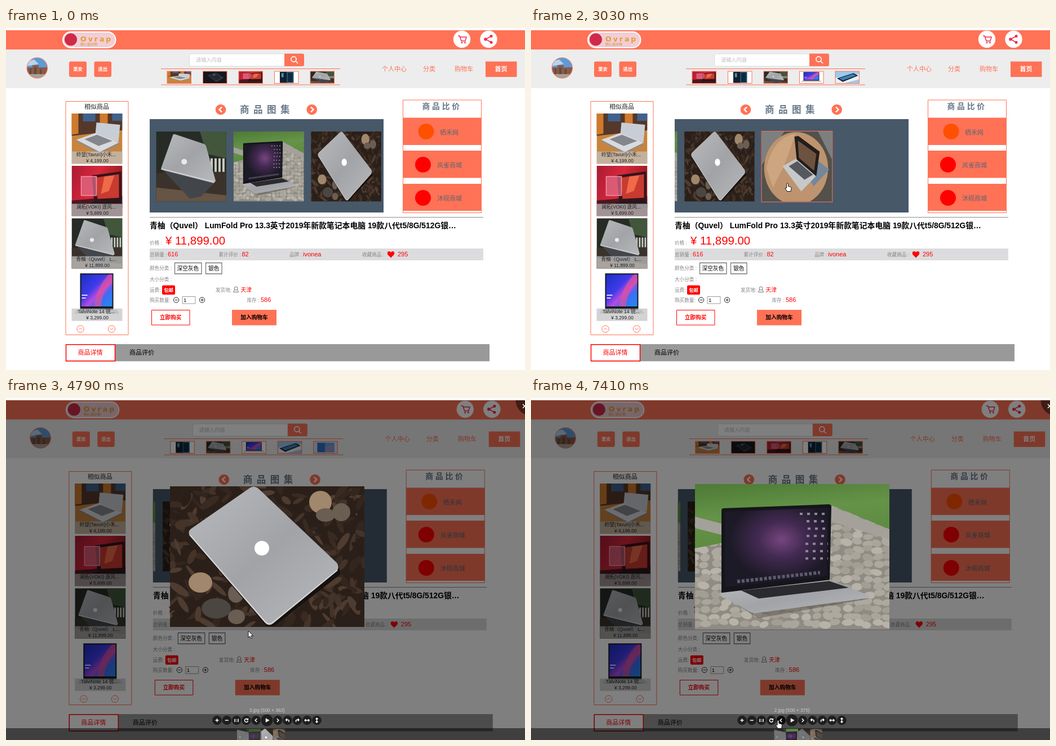
These frames come from a looping animation (921x608 px, 8000 ms). An HTML page:

```html
<!DOCTYPE html>
<html lang="zh-CN">
<head>
<meta charset="utf-8">
<title>商品详情</title>
<style>
html,body{margin:0;width:100%;height:100%;overflow:hidden;background:#fff}
svg{display:block}
text{font-family:"Liberation Sans","Noto Sans CJK SC","Noto Sans CJK",sans-serif;font-size:11px;white-space:pre}
.mid{text-anchor:middle}
.bold{font-weight:700}
.coral{fill:#ff7256}
.slate{fill:#66788a}
.red{fill:#f00}
.note text{font-size:8.6px;fill:#858585}
.ten{font-size:9.7px}
.edge{fill:none;stroke:#ff7256}
.white{fill:#fff}
.line{fill:none;stroke:#fff;stroke-width:2.4}
</style>
</head>
<body>
<svg id="stage" width="921" height="608" viewBox="0 0 921 608">
<defs>
  <linearGradient id="metal" x2="1" y2="1"><stop stop-color="#b9babd"/><stop offset=".5" stop-color="#a1a3a7"/><stop offset="1" stop-color="#b8b9bb"/></linearGradient>
  <radialGradient id="nebula" cx=".55" cy=".4"><stop stop-color="#76467f"/><stop offset=".45" stop-color="#432a52"/><stop offset="1" stop-color="#1d1a27"/></radialGradient>
  <linearGradient id="vivid" x2="1" y2="1"><stop stop-color="#1b2fc4"/><stop offset=".4" stop-color="#3f3bea"/><stop offset=".58" stop-color="#b94ae0"/><stop offset=".72" stop-color="#3f6cf4"/><stop offset="1" stop-color="#1f8cf0"/></linearGradient>
  <linearGradient id="neon" x2="1" y2=".4"><stop stop-color="#a81c34"/><stop offset=".5" stop-color="#d8283c"/><stop offset="1" stop-color="#8c1a1c"/></linearGradient>
  <linearGradient id="lawn" x2=".3" y2="1"><stop stop-color="#4d7a35"/><stop offset=".5" stop-color="#659348"/><stop offset="1" stop-color="#5b8a3e"/></linearGradient>

  <symbol id="wood" viewBox="0 0 90 90" preserveAspectRatio="none">
    <path fill="#c8843c" d="M0 0H90V90H0Z"/><path fill="#54382a" d="M0 0H90V30L0 40Z"/>
    <path fill="#d07a2c" d="M0 0H12V36L0 38ZM50 0H64V26L50 28Z"/><path fill="#41618c" d="M20 0H42V14H20ZM72 0H90V13H72Z"/>
    <path fill="#c9ced6" d="M44 16L86 20L83 51L42 38Z"/><path fill="#d9dadd" d="M8 47L42 35L84 52L50 69Z"/>
    <path fill="#83878d" d="M23 46L45 38L72 49L48 58Z"/><path fill="#8f8c88" d="M8 47L50 69L84 52V55L50 72L8 50Z"/>
  </symbol>
  <symbol id="phone" viewBox="0 0 90 90" preserveAspectRatio="none">
    <path fill="#15171c" d="M0 0H90V90H0Z"/><path fill="#343a46" d="M18 30L48 8L78 48L50 80Z"/><path fill="#222731" d="M24 32L47 14L70 47L49 70Z"/><circle cx="42" cy="26" r="5" fill="#596276"/>
  </symbol>
  <symbol id="game" viewBox="0 0 90 90" preserveAspectRatio="none">
    <path fill="url(#neon)" d="M0 0H90V90H0Z"/><path fill="#4a1820" d="M0 62L90 54V90H0Z"/>
    <path fill="#33151b" d="M36 17L88 10V62L40 65Z"/><path fill="#c93a30" d="M42 21L84 15V57L46 59Z"/>
    <path fill="#ee6a48" d="M58 19L76 17L66 45L52 50Z"/><path fill="#e2708c" opacity=".7" d="M17 19H44V53H17Z"/>
    <path fill="none" stroke="#f78fa8" stroke-width="1.5" d="M17 19H44V53H17Z"/><path fill="#2a161a" d="M34 65L84 60L90 67V75L34 78Z"/>
  </symbol>
  <symbol id="tall" viewBox="0 0 90 90" preserveAspectRatio="none">
    <path fill="#fff" d="M0 0H90V90H0Z"/><path fill="#12202e" d="M20 4H48V86H20Z"/><path fill="#235a78" d="M46 4H72V86H46Z"/><path fill="#0e2a3d" d="M50 10H68V80H50Z"/><path fill="#4d93ad" d="M26 14H34V44H26Z"/>
  </symbol>
  <symbol id="silver" viewBox="0 0 125 125" preserveAspectRatio="none">
    <path fill="#262c25" d="M0 0H125V125H0Z"/><path fill="#41563a" d="M78 0H125V48L90 40Z"/>
    <path fill="#3b322b" d="M0 74L125 72V125H0Z"/><path fill="#665444" d="M0 100L125 114V125H0Z"/>
    <path stroke="#c9c8bf" stroke-width="24" stroke-dasharray="4 3" d="M90 60H125"/>
    <path fill="#42464b" d="M9 65L105 90L80 116L60 120Z"/><path fill="url(#metal)" d="M30 6Q31 4 34 5L85 22Q88 23 89 26L106 88Q106 90 103 89L9 65Z"/>
    <path fill="#c9cbce" d="M9 65L105 89L103 92L9 68Z"/><circle cx="50" cy="54" r="5" fill="#e9e9eb"/>
  </symbol>
  <symbol id="violet" viewBox="0 0 90 90" preserveAspectRatio="none">
    <path fill="#fff" d="M0 0H90V90H0Z"/><path fill="#17181d" d="M15 5H74V70H15Z"/><path fill="url(#vivid)" d="M17 7H72V64H17Z"/>
    <path fill="#e0529c" opacity=".7" d="M40 64Q44 30 66 7H72V22Q54 36 52 64Z"/>
    <path fill="#b5b8be" d="M9 70H80L84 77H5Z"/><path fill="#fff" opacity=".8" d="M18 43h10v2H18zM18 48h7v2h-7z"/>
  </symbol>
  <symbol id="slab" viewBox="0 0 90 90" preserveAspectRatio="none">
    <path fill="#9cc9ee" d="M0 0H90V90H0Z"/><path fill="#e9f1f8" d="M0 48L90 20V60L30 90H0Z"/><path fill="#16222f" d="M6 52L68 14L86 32L28 78Z"/><path fill="#3d7fb6" d="M14 52L66 20L78 32L28 68Z"/>
  </symbol>
  <symbol id="tablet" viewBox="0 0 90 90" preserveAspectRatio="none">
    <path fill="#d5dde8" d="M0 0H90V90H0Z"/><path fill="#2b6fc4" d="M14 10H46V82H14Z"/><path fill="#57a2e6" d="M42 10H78V82H42Z"/><path fill="#b58fb4" d="M48 40L74 26V70L48 78Z"/>
  </symbol>
  <symbol id="black" viewBox="0 0 90 90" preserveAspectRatio="none">
    <path fill="#6d6a66" d="M0 0H90V90H0Z"/><path fill="#17171a" d="M4 20L84 10V56L8 64Z"/><path fill="#2b2a2c" d="M8 64L84 56L90 78L0 88Z"/>
  </symbol>
  <symbol id="stone" viewBox="0 0 345 258" preserveAspectRatio="none">
    <path fill="#8f8b82" d="M0 0H345V258H0Z"/><g id="cobbles"></g>
    <path fill="url(#lawn)" d="M0 0H345V80L238 36V60L50 104L0 114Z"/><path fill="#a3a199" d="M0 58L47 70V90L0 78ZM240 38L345 82V98L240 66Z"/>
    <path fill="#4a483f" opacity=".45" d="M50 198L312 203L112 238Z"/>
    <path fill="#15151b" d="M51 43Q47 43 47 47V194L239 171L242 40Q242 36 237 36Z"/><path fill="url(#nebula)" d="M53 49L236 42L234 163L53 183Z"/>
    <path fill="url(#metal)" d="M47 193L239 170L308 197V202L108 229Q102 230 96 226L47 198Z"/>
    <path fill="#2b2b2f" d="M82 189L238 172L273 184L113 203Z"/><path fill="#a2a5aa" d="M160 201L213 194L232 201L180 209Z"/>
    <path stroke="#8e8999" stroke-width="4" stroke-dasharray="5 8" d="M186 53H236M198 66H236M200 79H236M198 92H236M196 106H236M196 119H236M196 132H236"/>
    <path stroke="#5f5b6e" stroke-width="6" stroke-dasharray="5 3" d="M75 173L222 157"/>
  </symbol>
  <symbol id="bark" viewBox="0 0 345 250" preserveAspectRatio="none">
    <path fill="#2b2019" d="M0 0H345V250H0Z"/><g id="chips"></g>
    <g fill="#a1876b"><circle cx="267" cy="28" r="20"/><ellipse cx="54" cy="171" rx="21" ry="18"/></g>
    <g fill="#6a5d52"><circle cx="304" cy="46" r="16"/><ellipse cx="276" cy="51" rx="17" ry="12"/><ellipse cx="117" cy="191" rx="14" ry="16"/><ellipse cx="118" cy="232" rx="15" ry="13"/></g>
    <ellipse cx="82" cy="217" rx="26" ry="18" fill="#4b4641"/>
    <path fill="#17110d" d="M34 88L172 249H184L303 156L299 140L180 230Z"/>
    <path fill="url(#metal)" d="M143 2Q150-2 157 4L296 136Q302 145 295 151L184 243Q176 250 169 243L36 89Q30 81 38 75Z"/>
    <path fill="none" stroke="#d6d7da" stroke-width="2" d="M35 86L169 241Q176 248 184 241L297 149"/><circle cx="163" cy="110" r="13" fill="#fff"/>
  </symbol>
  <symbol id="table" viewBox="0 0 125 125" preserveAspectRatio="none">
    <path fill="#54504a" d="M0 0H125V125H0Z"/><path fill="#7d7f7e" d="M0 0H40L0 60ZM100 0H125V50Z"/><ellipse cx="61" cy="66" rx="57" ry="65" fill="#bd946f"/>
    <path fill="#cda680" d="M8 66Q20 10 60 4L40 60L20 100Z"/><path fill="#73879a" d="M97 50L120 68L92 98L84 82Z"/>
    <path fill="#c7c8ca" d="M37 62L62 48L98 78L70 107Z"/><path fill="#55585d" d="M48 62L63 53L91 77L76 86Z"/>
    <path fill="#231d1b" d="M58 9L65 8L103 36L97 80L62 50Z"/><path fill="#6e5240" d="M64 16L97 40L93 70L66 47Z"/>
  </symbol>
</defs>

<path fill="#fff" d="M0 0H921V608H0Z"/>
<path class="coral" d="M0 4H921V38.5H0Z"/>
<path fill="#ededed" d="M0 38.5H921V107H0Z"/>

<g id="page">
  <rect x="101" y="7" width="93.5" height="28" rx="14" fill="#f4cdd3" stroke="#fff" stroke-width="2"/>
  <circle cx="115" cy="20.5" r="11" fill="#cf2a48"/>
  <text x="132" y="24" fill="#dba03c" style="font:700 12.5px 'DejaVu Sans',sans-serif;letter-spacing:3px">Ovrap</text>
  <text x="132" y="31" fill="#d9894a" style="font-size:6px">随心逛好物</text>
  <g class="white"><circle cx="809" cy="20" r="15.2"/><circle cx="856.5" cy="20" r="15.2"/></g>
  <g fill="none" stroke="#ee2d4e" stroke-width="1.5"><path d="M802 14H805L808 23H815L817 16H806"/><path d="M861 14.5L851 20L861 25.5"/></g>
  <g fill="#ee2d4e"><circle cx="809" cy="26" r="1.4"/><circle cx="814.5" cy="26" r="1.4"/><circle cx="851" cy="20" r="2.8"/><circle cx="861" cy="14.5" r="2.5"/><circle cx="861" cy="25.5" r="2.5"/></g>

  <clipPath id="round"><circle cx="55.3" cy="71" r="18"/></clipPath>
  <g clip-path="url(#round)"><path fill="#5c9bd6" d="M36 52H75V91H36Z"/><path fill="#b9d3ea" d="M36 60L50 56L58 64L36 68Z"/><path fill="#8b5a46" d="M36 70H47V66H58V70H75V83H36Z"/><path fill="#5d4b44" d="M42 72H45V82H42ZM50 70H54V82H50ZM60 73H63V82H60Z"/><path fill="#a7a094" d="M36 82H75V91H36Z"/></g>
  <circle class="edge" cx="55.3" cy="71" r="18.3"/>
  <g class="coral"><rect x="112" y="59.5" width="31" height="27.5" rx="3"/><rect x="156.5" y="59.5" width="30.5" height="27.5" rx="3"/><path d="M851 59.5H906.5V87H851Z"/></g>
  <g class="mid white bold"><text x="127.5" y="76" style="font-size:8.4px">栗安</text><text x="171.7" y="76" style="font-size:8.4px">退出</text><text x="878.5" y="77">首页</text></g>

  <rect x="325.5" y="46" width="170" height="22" rx="3" fill="#fff" stroke="#dcdcdc"/>
  <path class="coral" d="M494 45.5H526Q529 45.5 529 48.5V65Q529 68 526 68H494Z"/>
  <g class="line" style="stroke-width:1.7"><path d="M513.5 58.5L518 63"/><circle cx="510.5" cy="55.5" r="4.6"/></g>
  <text x="337" y="60" fill="#bdbdbd" style="font-size:9.2px">请输入内容</text>
  <path class="edge" d="M275 72.5H593M275 101H593"/>
  <g id="strip"></g>
  <g class="coral" style="font-weight:500"><text x="667" y="77">个人中心</text><text x="740" y="77">分类</text><text x="796" y="77">购物车</text></g>

  <path class="edge" d="M106 130.5H217V545.5H106Z"/>
  <text class="mid" x="161" y="143.5" fill="#222">相似商品</text>
  <g id="similar"></g>
  <g class="edge"><circle cx="132" cy="535" r="6.2"/><circle cx="187.5" cy="535" r="6.2"/><path d="M129 536.5L132 533.5L135 536.5M184.500 533.5L187.5 536.5L190.5 533.5"/></g>

  <g class="coral"><circle cx="381" cy="145" r="9.3"/><circle cx="542.7" cy="145" r="9.3"/></g>
  <path class="line" d="M383 140.5L378.5 145L383 149.5M541 140.5L545.5 145L541 149.5"/>
  <text class="bold slate" x="415" y="151" style="font-size:16.6px;letter-spacing:7.4px">商品图集</text>
  <path fill="#475869" d="M255 162H670V328H255Z"/>
  <svg x="255" y="162" width="415" height="166" viewBox="255 162 415 166"><g id="slides"></g></svg>

  <path class="edge" d="M704.5 128H843.5V328.5H704.5Z"/>
  <text class="bold slate" x="738.5" y="144" style="font-size:13.8px;letter-spacing:3.8px">商品比价</text>
  <path class="coral" d="M704 159.5H844V208H704ZM704 218H844V266.5H704ZM704 277H844V325H704Z"/>
  <circle cx="745.5" cy="184" r="14" fill="#ff5000"/><g class="red"><circle cx="740" cy="243" r="14"/><circle cx="740" cy="302" r="14"/></g>
  <g fill="#5a6673"><text x="770" y="189.5">栖禾网</text><text x="765" y="248">岚雀商城</text><text x="765" y="307">沐砚商城</text></g>

  <path stroke="#8c8c8c" d="M255 336.5H847"/>
  <text class="bold" x="255" y="355.5" style="font-size:13.85px">青柚（Quvel） LumFold Pro 13.3英寸2019年新款笔记本电脑 19款八代t5/8G/512G银…</text>
  <text class="red" x="283" y="385" style="font-size:20.4px">¥ 11,899.00</text>
  <path fill="#dcdcde" d="M255 392H847V413H255Z"/>
  <g class="note">
    <text x="255" y="385">价格 :</text><text x="255" y="406">总销量 :</text><text x="377.5" y="406">累计评价 :</text><text x="503" y="406">品牌 :</text><text x="632" y="406">收藏商品 :</text>
    <text x="255" y="430">颜色分类 :</text><text x="255" y="450">大小分类 :</text><text x="255" y="468.5">运费:</text><text x="372" y="468.5">发货地:</text><text x="255" y="487">购买数量:</text><text x="427.5" y="487">库存 :</text>
  </g>
  <g class="red"><text x="287" y="406">616</text><text x="418.5" y="406">82</text><text x="527" y="406">ivonea</text><text x="695" y="406">295</text><text x="452" y="487">586</text><text class="ten" x="416.5" y="468.5">天津</text>
    <path d="M683 408.5L677.5 403Q675.5 399 678.5 397.3Q681.5 396 683 399Q684.5 396 687.5 397.3Q690.5 399 688.5 403Z"/><rect x="277" y="457.5" width="23" height="16.5" rx="2"/></g>
  <text class="mid bold white" x="288.5" y="469" style="font-size:8.4px">包邮</text>
  <g fill="none" stroke="#777"><path stroke-width="1.3" d="M299.5 417.5H347V437H299.5ZM354.5 417.5H383V437H354.5Z"/><path d="M313 477.5H336V490H313Z" stroke="#999"/><circle cx="408" cy="463" r="3"/><path d="M405.5 465L403.5 469.5H412.5L410.5 465"/></g>
  <g fill="none" stroke="#222"><circle cx="302" cy="483.5" r="4.7"/><circle cx="348" cy="483.5" r="4.7"/><path d="M299.5 483.5H304.5M345.5 483.5H350.5M348 481V486"/></g>
  <text class="ten" x="303.5" y="430.5">深空灰色</text><text class="ten" x="359" y="430.5">银色</text><text class="ten" x="315" y="487">1</text>
  <path fill="#fff" stroke="#f00" d="M258.5 501.5H326V528H258.5Z"/><path class="coral" d="M401 501H480V528.5H401Z"/>
  <text class="mid bold red ten" x="292" y="518">立即购买</text><text class="mid bold ten" x="440.5" y="518">加入购物车</text>
  <path fill="#999" d="M106 562H858V592.5H106Z"/><path fill="#fff" stroke="#f00" stroke-width="1.5" d="M106.5 562.8H193.5V592H106.5Z"/>
  <text class="mid red" x="149.5" y="581">商品详情</text><text x="219" y="581">商品评价</text>
</g>

<g id="viewer">
  <path opacity=".5" d="M0 4H921V608H0Z"/><path opacity=".5" d="M0 587H921V608H0Z"/>
  <circle cx="932" cy="4" r="27.6" opacity=".5"/><path stroke="#fff" stroke-width="1.5" d="M917 11L924 18M924 11L917 18"/>
  <use id="photo" x="291" width="345"/>
  <text id="caption" class="mid" x="463.3" y="557.5" fill="#ccc" style="font-size:8.3px"></text>
  <g id="toolbar"></g>
  <svg y="588" width="921" height="20"><g id="thumbs"></g></svg>
</g>
<path fill="#fff" d="M0 0H921V4H0Z"/>
<g fill="#fff" stroke="#000" stroke-width=".9">
  <path id="arrow" d="M0 0V12L2.8 9.5L4.6 13.5L6.6 12.7L4.8 8.7H8.8Z"/>
  <path id="hand" d="M0 0Q1.4 0 1.4 1.4V5.5L5.5 6.5Q7.3 7 7 9L6 14.5H-.5L-4 9Q-4 7-1.4 8.5V1.4Q-1.4 0 0 0Z"/>
</g>
</svg>
<script>
const $ = id => document.getElementById(id);
const each = (n, make) => Array.from({length: n}, (_, i) => make(i)).join('');
const use = (name, x, y, w, h) => `<use href="#${name}" x="${x}" y="${y}" width="${w}" height="${h}"/>`;

let seed = 7;
const rnd = (a, b) => a + (b - a) * ((seed = seed * 16807 % 2147483647) / 2147483647);
const pick = list => list[Math.floor(rnd(0, list.length))];
const pebble = (x, y, rx, ry, turn, fill) =>
  `<ellipse transform="translate(${x} ${y}) rotate(${turn})" rx="${rx}" ry="${ry}" fill="${fill}"/>`;

$('chips').innerHTML = each(260, () => pebble(rnd(0, 345), rnd(0, 250), rnd(9, 20), rnd(3, 7), rnd(0, 180),
  pick(['#3a2b22', '#443329', '#4f3c30', '#33261e', '#2a1f18'])));
$('cobbles').innerHTML = each(400, i => pebble(i % 20 * 18 + rnd(-4, 4), (i / 20 | 0) * 13 + rnd(-3, 3),
  rnd(8, 11), rnd(5, 7), rnd(-20, 20), pick(['#aea99f', '#a39e94', '#b8b3a9', '#aaa59b'])));

const goods = ['wood', 'phone', 'game', 'tall', 'silver', 'violet', 'slab', 'tablet', 'black'];
const gallery = ['silver', 'stone', 'bark', 'table'];
const similar = [['wood', '岭望(Tavuri)小禾...', '4,199.00'], ['game', '澜拓(VOKI) 逐风...', '5,699.00'],
  ['silver', '青柚（Quvel） L...', '11,899.00'], ['violet', 'TalviNote 14 锐...', '3,299.00']];

$('strip').innerHTML = each(5, i => {
  const x = 286 + 63.5 * i;
  return use('wood', x, 77, 42.5, 21.5) + `<rect class="edge" x="${x}" y="77" width="42.5" height="21.5"/>`;
});
$('similar').innerHTML = similar.map(([name, label, price], i) => {
  const y = 152 + 93.1 * i;
  return use(name, 116.5, y, 90, 89.5) +
    `<path fill="#c3c3c3" opacity=".72" d="M116.5 ${y + 67.5}h90v22h-90z"/>` +
    `<g class="mid" fill="#222"><text x="160" y="${y + 76}" style="font-size:8.6px">${label}</text>` +
    `<text x="162" y="${y + 87}" style="font-size:8.4px">¥ ${price}</text></g>`;
}).join('');
$('slides').innerHTML = gallery.map((name, i) => {
  const x = 266.4 + 137.5 * i;
  return use(name, x, 184, 124.5, 124.5) +
    `<rect class="edge" x="${x - .6}" y="183.5" width="125.7" height="125.7"/>`;
}).join('');
$('thumbs').innerHTML = gallery.map((name, i) =>
  `<svg x="${i * 21.4}" width="20.7" height="34.5">${use(name, -14, 0, 48, 34.5)}</svg>`).join('');

const icons = ['M-3 0H3M0-3V3', 'M-3 0H3', 'M-3-2.5V3M3-2.5V3M0-1.5V-.2M0 1.2V2.5', 'M2.5-1.5A3 3 0 1 0 3 1M3-3.5V-1H.5',
  'M1.5-3L-1.5 0L1.5 3', 'M-1.5-2.5L3 0L-1.5 2.5Z', 'M-1.5-3L1.5 0L-1.5 3', 'M-3-.8H1Q3.5 0 2 3M-1-3L-3-.8L-1 1.4',
  'M3-.8H-1Q-3.5 0-2 3M1-3L3-.8L1 1.4', 'M-4 0H4M-2-2L-4 0L-2 2M2-2L4 0L2 2', 'M0-4V4M-2-2L0-4L2-2M-2 2L0 4L2 2'];
$('toolbar').innerHTML = icons.map((d, i) => {
  const k = i - 5, x = 463 + Math.sign(k) * (2 + 17.3 * Math.abs(k));
  return `<g transform="translate(${x} 573)"><circle r="${k ? 8.3 : 10.5}"/>` +
    `<path d="${d}" fill="${k ? 'none' : '#fff'}" stroke="#fff" stroke-width="1.5"/></g>`;
}).join('');

const photos = {
  3: {name: 'bark', y: 157, h: 250, label: '3.jpg (500 × 362)'},
  2: {name: 'stone', y: 153, h: 258.5, label: '2.jpg (500 × 375)'}
};

// Each step lists only what differs from the one before.
const steps = [
  {at: 0, first: 0, slide: 0, hover: -1, cursor: null, viewer: false, photo: 0, fade: 1, thumbs: 410, button: -1},
  {at: 480, first: 1, cursor: ['arrow', 538, 223]},
  {at: 860, cursor: ['arrow', 546, 152]},
  {at: 1310, cursor: ['arrow', 548, 145]},
  {at: 1760, slide: -100},
  {at: 2220, first: 2, slide: -252.4, cursor: ['arrow', 343, 234]},
  {at: 2600, slide: -269.2, hover: 2, cursor: ['hand', 347, 245]},
  {at: 3030, hover: 3, cursor: ['hand', 455, 276]},
  {at: 3480, first: 3, hover: -1, cursor: ['arrow', 460, 345]},
  {at: 3910, hover: 2, cursor: ['hand', 356, 280]},
  {at: 4360, hover: -1, viewer: true, cursor: ['arrow', 445, 346]},
  {at: 4790, photo: 3, cursor: ['arrow', 430, 414]},
  {at: 5210, first: 4, cursor: ['arrow', 419, 388]},
  {at: 5660, cursor: ['arrow', 437, 523.5]},
  {at: 6100, button: 2, cursor: ['hand', 408, 568]},
  {at: 6530, first: 0, button: 4, cursor: ['hand', 439, 574]},
  {at: 6960, photo: 2, fade: .6, thumbs: 421},
  {at: 7410, fade: 1, thumbs: 431.5, cursor: ['hand', 438.5, 573]}
];
steps.forEach((s, i) => steps[i] = {...steps[i - 1], ...s});

const show = (el, on) => el.style.display = on ? '' : 'none';

function draw(s) {
  $('page').setAttribute('transform', `translate(${s.viewer ? 5.8 : 0})`);
  $('strip').querySelectorAll('use').forEach((u, i) => u.setAttribute('href', '#' + goods[s.first + i]));
  $('slides').setAttribute('transform', `translate(${s.slide})`);
  $('slides').querySelectorAll('rect').forEach((r, i) => show(r, i === s.hover));
  for (const id of ['arrow', 'hand']) {
    const on = s.cursor && s.cursor[0] === id;
    show($(id), on);
    if (on) $(id).setAttribute('transform', `translate(${s.cursor[1]} ${s.cursor[2]})`);
  }
  show($('viewer'), s.viewer);
  const photo = photos[s.photo];
  for (const id of ['photo', 'caption', 'thumbs']) show($(id), photo);
  if (photo) {
    $('photo').setAttribute('href', '#' + photo.name);
    $('photo').setAttribute('y', photo.y);
    $('photo').setAttribute('height', photo.h);
    $('photo').setAttribute('opacity', s.fade);
    $('caption').textContent = photo.label;
    $('thumbs').setAttribute('transform', `translate(${s.thumbs})`);
    [...$('thumbs').children].forEach((t, i) => t.setAttribute('opacity', i === s.photo - 1 ? 1 : .5));
  }
  $('toolbar').querySelectorAll('circle').forEach((c, i) => c.setAttribute('opacity', i === s.button ? .85 : .6));
}

const start = performance.now();
let current;
function tick() {
  const time = Math.max(0, performance.now() - start) % 8000;
  const step = steps.findLast(s => s.at <= time);
  if (step !== current) draw(current = step);
  requestAnimationFrame(tick);
}
tick();
</script>
</body>
</html>
```
